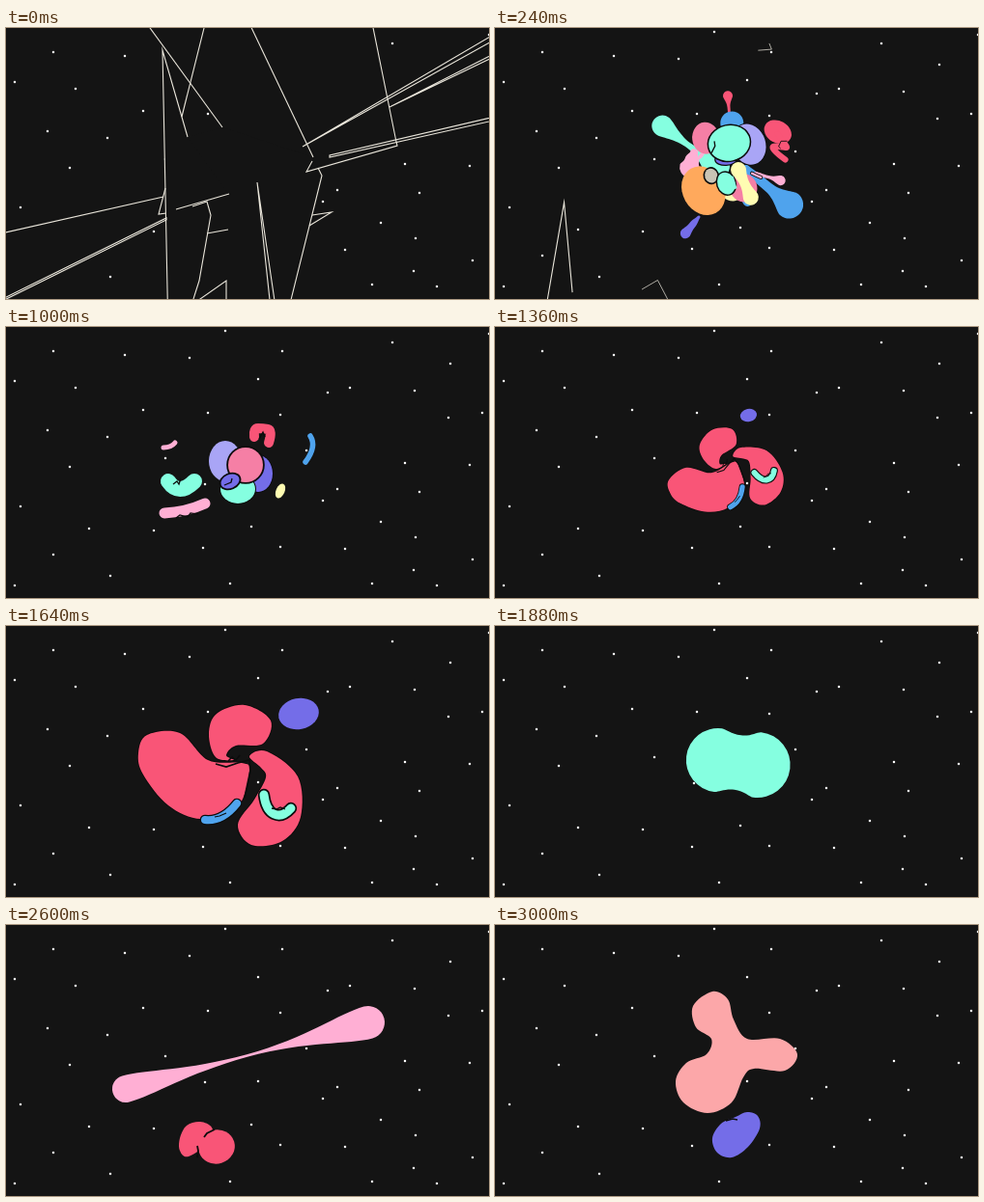
Animation, 500 px wide and 281 px high, one loop 3040 ms. Source, as an HTML page with a canvas:

```html
<!DOCTYPE html>
<html lang="en">
<head>
<meta charset="utf-8">
<title>Blobs in space</title>
<style>
html, body { margin: 0; width: 100%; height: 100%; overflow: hidden; background: #141414; }
canvas { display: block; width: 100vw; height: 100vh; }
</style>
</head>
<body>
<canvas id="c" width="500" height="281"></canvas>
<script>
const g = document.getElementById('c').getContext('2d');
const LOOP = 3040, STEP = 40, HOLDS = [40, 600, 1200, 2880];
const BG = '#141414', INK = '#0c0c0c', CHALK = '#e9e5da';
const MINT = '#85ffe0', PINK = '#ffafd4', ROSE = '#f57fa5', RED = '#f95577', BLUE = '#4fa3ed',
  LILAC = '#a9a5f6', ORANGE = '#ffa95c', CREAM = '#fffcb2', VIOLET = '#746de8', SALMON = '#fca7a9';
const CX = 243, CY = 140;

const STARS = [49,25, 123,29, 190,32, 227,4, 286,25, 400,16, 460,38, 9,56, 72,63, 261,54, 333,68, 356,63,
  423,66, 142,86, 209,89, 284,91, 458,94, 493,89, 43,107, 105,114, 311,128, 165,136, 413,141, 480,143,
  66,145, 206,163, 261,162, 343,168, 428,171, 328,180, 15,186, 86,209, 153,211, 254,207, 388,202, 424,218,
  204,229, 284,228, 351,230, 483,241, 49,236, 108,258, 232,266, 9,268, 379,266, 422,252, 446,268, 500,7];

// Eased value between pairs of time and value
function key(t, ...k) {
  if (t <= k[0]) return k[1];
  for (let i = 2; i < k.length; i += 2) {
    if (t <= k[i]) {
      const p = (t - k[i - 2]) / (k[i] - k[i - 2]);
      return k[i - 1] + (k[i + 1] - k[i - 1]) * p * p * (3 - 2 * p);
    }
  }
  return k[k.length - 1];
}

function at(x, y, scale, turn, draw, dx = 0, dy = 0) {
  g.save();
  g.translate(x + dx, y + dy);
  g.rotate(turn);
  g.scale(scale, scale);
  g.translate(-x, -y);
  draw();
  g.restore();
}

function paint(color, edge) {
  if (edge) {
    g.strokeStyle = INK;
    g.lineWidth = edge * 2;
    g.lineJoin = 'round';
    g.stroke();
  }
  g.fillStyle = color;
  g.fill();
}

function oval(color, x, y, rx, ry = rx, turn = 0, edge = 0) {
  g.beginPath();
  g.ellipse(x, y, rx, ry, turn, 0, 7);
  paint(color, edge);
}

// Smooth closed curve through points
function blob(color, p, edge) {
  const n = p.length / 2;
  const X = i => p[(i + n) % n * 2], Y = i => p[(i + n) % n * 2 + 1];
  g.beginPath();
  g.moveTo(X(0), Y(0));
  for (let i = 0; i < n; i++) {
    g.bezierCurveTo(
      X(i) + (X(i + 1) - X(i - 1)) / 6, Y(i) + (Y(i + 1) - Y(i - 1)) / 6,
      X(i + 1) - (X(i + 2) - X(i)) / 6, Y(i + 1) - (Y(i + 2) - Y(i)) / 6,
      X(i + 1), Y(i + 1));
  }
  paint(color, edge);
}

// Two round heads joined by a thin neck
function bell(color, x1, y1, r1, x2, y2, r2, neck) {
  const len = Math.hypot(x2 - x1, y2 - y1), h = len / 2;
  g.save();
  g.translate(x1, y1);
  g.rotate(Math.atan2(y2 - y1, x2 - x1));
  g.beginPath();
  g.arc(0, 0, r1, Math.PI / 2, Math.PI * 1.5);
  g.bezierCurveTo(len * .1, -r1, len * .25, -neck, h, -neck);
  g.bezierCurveTo(len * .75, -neck, len * .9, -r2, len, -r2);
  g.arc(len, 0, r2, -Math.PI / 2, Math.PI / 2);
  g.bezierCurveTo(len * .9, r2, len * .75, neck, h, neck);
  g.bezierCurveTo(len * .25, neck, len * .1, r1, 0, r1);
  paint(color);
  g.restore();
}

function worm(color, width, p, edge) {
  const n = p.length;
  g.beginPath();
  g.moveTo(p[0], p[1]);
  for (let i = 2; i < n - 4; i += 2) {
    g.quadraticCurveTo(p[i], p[i + 1], (p[i] + p[i + 2]) / 2, (p[i + 1] + p[i + 3]) / 2);
  }
  g.quadraticCurveTo(p[n - 4], p[n - 3], p[n - 2], p[n - 1]);
  g.lineCap = g.lineJoin = 'round';
  if (edge) {
    g.strokeStyle = INK;
    g.lineWidth = width + edge * 2;
    g.stroke();
  }
  g.strokeStyle = color;
  g.lineWidth = width;
  g.stroke();
}

function trace(p) {
  g.beginPath();
  for (let i = 0; i < p.length; i += 2) g.lineTo(p[i], p[i + 1]);
}

function lines(p, width = 1.1, color = CHALK) {
  trace(p);
  g.strokeStyle = color;
  g.lineWidth = width;
  g.lineCap = 'butt';
  g.lineJoin = 'miter';
  g.stroke();
}

const shards = [];
function shard(dx, dy, spin, cover, ...edges) {
  shards.push({ dx, dy, spin, cover, edges });
}
shard(-.3, -1, -.4, [120,-40, 224,103, 318,134, 239,-32],
  [120,-40, 224,103], [207,-8, 182,92], [239,-32, 318,134]);
shard(.7, -.9, .5, [239,-32, 318,134, 311,149, 404,122, 374,-30],
  [317,138, 311,149, 405,122, 404,118, 374,-30]);
shard(1.2, -.35, .2, [307,123, 540,-12, 540,80, 335,133],
  [540,-14, 307,123, 540,-7], [540,9, 397,82, 540,13], [540,84, 335,132, 335,134, 540,88]);
shard(-1.2, .4, -.2, [-40,221, 163,175, 158,193, 166,198, -40,300],
  [-40,221, 163,175], [165,166, 158,193, 166,192], [-40,299, 166,197, 166,199, -40,301]);
shard(-.6, .9, .4, [162,23, 168,320, 230,320, 230,172, 188,113],
  [188,113, 162,23, 168,320], [176,188, 231,172], [193,185, 208,180, 212,194, 200,262, 188,300],
  [208,213, 230,209], [174,300, 228,262, 228,300]);
shard(.4, 1.1, -.3, [188,113, 224,103, 318,134, 327,153, 290,301, 230,301, 230,172],
  [276,310, 260,160, 282,310], [323,145, 327,153, 288,310], [317,194, 337,191, 314,205]);

function shatter(t) {
  if (t > 560) return;
  const d = t < 80 ? 0 : (t - 40) * .95;
  const place = (s, draw) => at(CX, CY, 1, s.spin * d / 400, draw, s.dx * d, s.dy * d);
  if (t < 480) {
    for (const s of shards) place(s, () => {
      trace(s.cover);
      g.fillStyle = BG;
      g.fill();
    });
    for (const s of shards) place(s, () => s.edges.forEach(e => lines(e)));
  }
  if (t >= 120) {
    at(CX, CY, Math.pow((t - 40) / 480, .6), (t - 520) / 500, () => {
      lines([390,-1, 411,10, 413,-1]);
      lines([-5,246, 27,247, 24,285]);
    });
  }
}

// Drops that stay tied to the middle
function tears(k) {
  const tear = (color, x1, y1, r1, x2, y2, r2, neck) => bell(color,
    x2 + (x1 - x2) * k, y2 + (y1 - y2) * k, r1 * Math.sqrt(k), x2, y2, r2, neck);
  tear(MINT, 88, 38, 17.5, 229, 143, 14, 3);
  tear(RED, 238, 34, 8, 243, 94, 1, 1.5);
  tear(BLUE, 373, 240, 23, 260, 146, 4, 5);
  tear(PINK, 335, 169, 8, 270, 151, 2, 1.5);
  tear(VIOLET, 176, 239, 8.5, 211, 196, 1.5, 3.5);
}

function looseDrops(k, size) {
  const drop = (x, y, draw) =>
    at(x, y, size, (k - 1) * 2, draw, (x - CX) * (k - 1), (y - CY) * (k - 1));
  drop(135, 143, () => bell(PINK, 130, 143, 16, 153, 142, 6, 11));
  drop(166, 118, () => oval(PINK, 166, 117, 8.5, 3, .35));
  drop(243, 227, () => oval(CREAM, 243, 227, 9.5, 16, .08));
  drop(292, 243, () => oval(BLUE, 292, 243, 10, 8, -.4));
  drop(377, 72, () => {
    oval(RED, 387, 69, 17, 22, .2);
    worm(RED, 9, [350,93, 354,80, 363,65, 367,80, 368,93, 378,76, 384,70]);
    lines([364,81, 366,77, 375,78, 378,87], 1.2, INK);
  });
}

function burstCore() {
  oval(ROSE, 224, 101, 17, 20, .2);
  oval(BLUE, 261, 93, 14.5);
  oval(LILAC, 273, 125, 21, 26, 0, 1);
  oval(ORANGE, 201, 163, 26, 32, -.2);
  oval(ROSE, 250, 175, 17, 18);
  oval(VIOLET, 240, 134, 13, 7, .25, 1.5);
  oval(MINT, 250, 116, 26, 22, .1, 1.8);
  lines([225,121, 232,114, 233,108], 1.6, INK);
  oval('#c9c4b5', 216, 148, 8, 9, 0, 2);
  oval(MINT, 231, 163, 11, 14, 0, 1.8);
  g.fillStyle = MINT;
  g.fillRect(231, 157, 11, 16);
}

function burst(t) {
  if (t < 120 || t >= 920) return;
  const k = key(t, 80, .05, 480, 1.03, 520, 1, 560, .96, 800, .15);
  const core = key(t, 80, .1, 320, 1.08, 520, 1, 760, .72);
  if (t < 800) tears(k);
  looseDrops(key(t, 80, .1, 520, 1, 560, 1.03, 920, 1.06), key(t, 120, .3, 360, 1.05, 520, 1, 920, .05));
  if (t < 760) {
    at(CX, CY, core, (t - 520) / 900, burstCore);
    bell(CREAM, 253 + 30 * k, 148 + 70 * k, 8, 252, 147, 8, 5);
    at(CX, CY, core, 0, () => worm(PINK, 3, [271,153, 277,156, 282,158], 1));
  }
}

function cluster() {
  oval(LILAC, 227, 139, 17, 21);
  oval(VIOLET, 261, 152, 15, 19, 0, 1);
  oval(MINT, 240, 168, 18, 15, 0, 1);
  oval(ROSE, 248, 143, 18, 18, 0, 1.8);
  oval(VIOLET, 232, 160, 10, 7, -.4, 1.8);
  lines([226,164, 233,161, 234,157], 1.3, INK);
}

function crawlers(t) {
  if (t < 760 || t >= 1160) return;
  const s = key(t, 760, .4, 920, 1.1, 1000, 1, 1160, .2);
  const pull = key(t, 760, 1.15, 1000, 1, 1160, .8);
  at(CX, CY, pull, (t - 1000) / 1500, () => {
    const bit = (x, y, draw) => at(x, y, s, 0, draw);
    bit(265, 112, () => {
      worm(RED, 10, [257,114, 256,105, 266,105, 276,107, 272,120]);
      lines([262,116, 266,109, 268,114], 1.3, INK);
    });
    bit(315, 127, () => worm(BLUE, 5.5, [315,113, 322,124, 310,140]));
    bit(284, 170, () => oval(CREAM, 284, 170, 4.5, 8, .4));
    bit(170, 123, () => worm(PINK, 5, [163,125, 171,125, 175,120]));
    bit(181, 164, () => {
      worm(MINT, 16, [168,160, 179,176, 195,160]);
      lines([173,163, 177,160, 179,163, 181,157], 1.3, INK);
    });
    bit(185, 188, () => {
      worm(PINK, 11, [164,193, 186,192, 206,183]);
      lines([176,198, 180,195, 188,197, 191,193, 199,194], 1.2, INK);
    });
  });
}

function lobes() {
  blob(RED, [210,112, 218,91, 247,82, 274,98, 266,122, 238,124, 228,134, 236,139, 217,136], 1);
  blob(RED, [137,132, 146,113, 180,111, 209,139, 244,142, 252,150, 240,187, 202,200, 168,186, 142,154], 1);
  blob(RED, [252,135, 270,130, 302,156, 305,198, 286,223, 254,227, 240,206, 257,180, 269,157, 264,147], 1);
  lines([217,143, 228,146, 240,142, 252,139, 253,150, 247,178], 1.8, INK);
  lines([230,140, 234,136, 238,139, 242,134], 1.5, INK);
  worm(MINT, 9, [267,175, 269,191, 286,199, 295,189], 1.7);
  lines([275,189, 280,190, 284,188, 289,190], 1.3, INK);
  worm(BLUE, 8, [206,201, 224,203, 239,184], 1.3);
  lines([216,198, 221,197, 228,194], 1.2, INK);
}

function swirl(t) {
  if (t < 1240 || t >= 1800) return;
  at(CX, CY, key(t, 1200, .35, 1560, 1.08, 1640, 1, 1780, .58), (t - 1640) * .002, lobes);
  const a = (t - 1640) * .0018;
  at(CX, CY, key(t, 1240, .5, 1560, 1.05, 1640, 1, 1780, .8), a, () =>
    at(303, 91, key(t, 1240, .3, 1520, 1.1, 1640, 1, 1780, .7), -a, () => oval(VIOLET, 303, 91, 21, 16, -.2)));
}

function mintPull(t) {
  const k = key(t, 1800, .12, 2200, 1, 2320, 1.17, 2420, .15);
  const tilt = key(t, 1800, -1.2, 2200, 0, 2320, .04, 2440, .8);
  const size = key(t, 1800, 34, 2200, 25, 2320, 24, 2420, 30);
  const neck = key(t, 1800, 34, 2000, 18, 2200, 3.6, 2320, 2, 2420, 28);
  at(251, 142, 1, tilt, () => bell(MINT, 251 - 33 * k, 142 - 90 * k, size,
    251 + 38 * k, 142 + 90 * k, size + 1, neck));
  if (t >= 1960 && t < 2360) {
    at(211, 88, key(t, 1920, .3, 2160, 1.05, 2200, 1, 2360, .7), (t - 2200) / 700, () =>
      blob(RED, [199,76, 207,80, 217,80, 224,89, 219,97, 207,97, 199,88], 1.7));
  }
}

function pinkPull(t) {
  const k = key(t, 2420, .1, 2600, 1, 2780, .1), q = 1 - k;
  at(250, 136, 1, (t - 2600) * .0012 * (1.2 - k), () => bell(PINK,
    250 - 126 * k, 136 + 34 * k, 14 + 14 * q, 250 + 125 * k, 136 - 35 * k, 17 + 12 * q, 1.2 + 27 * q * q));
  at(208, 226, key(t, 2400, .5, 2560, 1.05, 2600, 1, 2800, .8), (t - 2600) / 500, () => {
    blob(RED, [180,221, 187,208, 201,204, 213,210, 212,224, 189,240, 180,234]);
    oval(RED, 218, 230, 19, 17.5, -.3);
    lines([205,220, 208,216, 216,212], 1.8, INK);
    lines([198,229, 199,234, 198,241], 1.8, INK);
  });
}

function threeHeads(t) {
  at(240, 137, key(t, 2780, .6, 2920, .93, 3000, 1), (t - 3000) / 700, () =>
    blob(SALMON, [225,69, 241,77, 247,98, 261,118, 295,118, 313,134, 300,151, 268,149, 257,158, 245,184,
      220,195, 195,184, 187,162, 198,143, 219,134, 224,118, 208,106, 205,84]));
  at(250, 218, key(t, 2800, .7, 3000, 1), (t - 3000) / 600, () => {
    blob(VIOLET, [261,194, 272,198, 274,211, 262,230, 245,241, 230,236, 225,221, 234,206, 249,199]);
    lines([239,203, 246,201, 251,202], 1.4, INK);
  }, 0, key(t, 2800, 18, 3000, 0));
}

function frame(now) {
  let t = Math.floor(now % LOOP / STEP) * STEP;
  if (HOLDS.includes(t)) t -= STEP;
  g.fillStyle = BG;
  g.fillRect(0, 0, 500, 281);
  for (let i = 0; i < STARS.length; i += 2) oval('#fff', STARS[i], STARS[i + 1], 1.25);
  shatter(t);
  burst(t);
  if (t >= 760 && t < 1240) {
    at(CX, 150, key(t, 760, 1.25, 1000, 1, 1200, .65), (t - 1000) / 600, cluster);
  }
  crawlers(t);
  swirl(t);
  if (t >= 1800 && t < 2440) mintPull(t);
  if (t >= 2440 && t < 2800) pinkPull(t);
  if (t >= 2800) threeHeads(t);
}

const start = performance.now();
function loop() {
  frame(performance.now() - start);
  requestAnimationFrame(loop);
}
loop();
</script>
</body>
</html>
```
